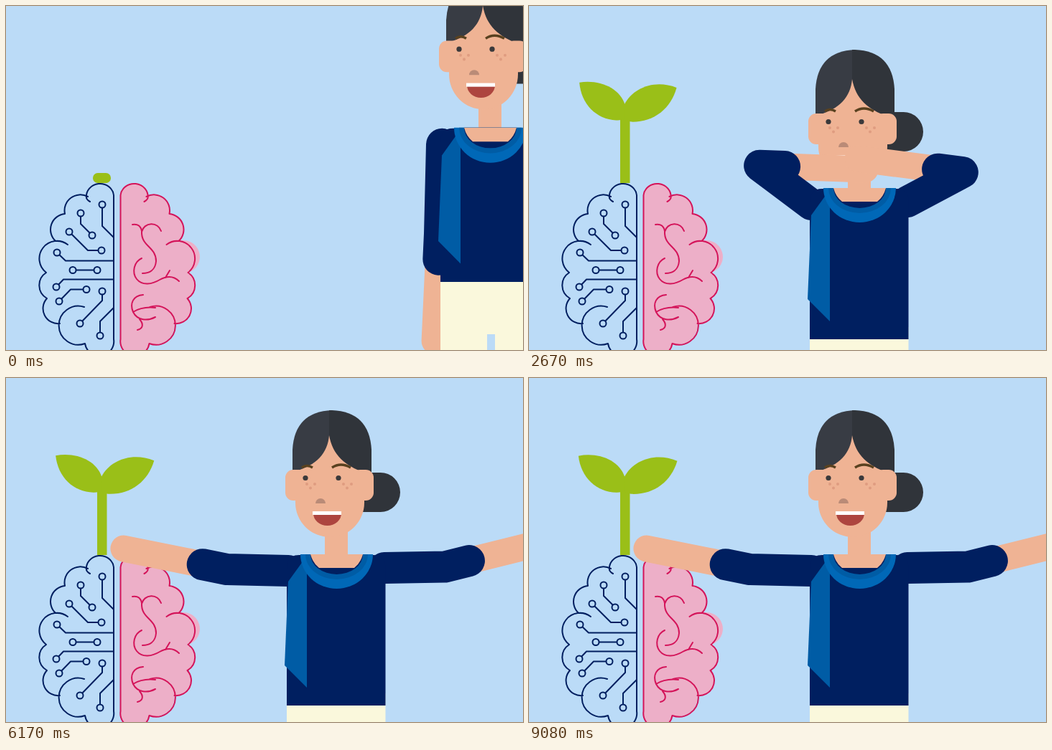
These frames come from a looping animation (720 px wide and 480 px high, 9.16 s). An HTML page:

```html
<!DOCTYPE html>
<html lang="en">
<head>
<meta charset="utf-8">
<title>Growing mind</title>
<style>
html, body { margin: 0; width: 100%; height: 100%; overflow: hidden; background: #bbdbf7; }
svg { display: block; width: 720px; height: 480px; }
</style>
</head>
<body>
<svg viewBox="0 0 720 480" xmlns="http://www.w3.org/2000/svg">
  <defs>
    <path id="half" d="M150 264A19 18 0 0 0 112 268Q113 271 117 273M114 266A22 22 0 0 0 82 290A22 22 0 0 0 69 328M86 333A22 22 0 1 0 56 372A21 21 0 0 0 57 408A21 21 0 0 0 75 443M109 420A27 27 0 1 0 110 471A20 20 0 0 0 150 465V264"/>
    <path id="halfFill" d="M150 264A19 18 0 0 0 112 266A22 22 0 0 0 82 290A22 22 0 0 0 69 328A22 22 0 0 0 56 372A21 21 0 0 0 57 408A21 21 0 0 0 75 443A27 27 0 0 0 110 471A20 20 0 0 0 150 465Z"/>
  </defs>
  <rect width="720" height="480" fill="#bbdbf7"/>

  <g fill="#9abf18">
    <rect id="stem" x="127" width="13.5"/>
    <rect id="bud" x="121" y="233" width="25" height="14" rx="6.8"/>
    <g id="leaves">
      <path id="leafL" d="M134 158Q128 160 122 160C94 160 72 140 68 110C96 104 125 115 133 138Z"/>
      <path id="leafR" d="M132 159Q136 161 142 162C173 164 198 146 207 117C178 104 146 114 133 138Z"/>
    </g>
  </g>

  <g fill="none" stroke-width="2" stroke-linecap="round" stroke-linejoin="round">
    <g stroke="#001f60">
      <use href="#half"/>
      <path d="M134 277V307L150 323M104 289V304L120 320M88 315L114 341H133M71 344L83 355.5H150M93 368.5H127M70 392L80 381.5H150M74 412L90 395.5H112M134 398V411L103 443M131 460V440L150 421"/>
      <g id="nodes" fill="#bbdbf7"></g>
    </g>
    <g stroke="#d4145a">
      <g transform="matrix(-1 0 0 1 309.5 0)">
        <use href="#halfFill" fill="#edafc8" stroke="none"/>
        <use href="#half"/>
      </g>
      <path d="M176 305Q187 303 189 314M216 314A14 14 0 0 0 189 315C188 335 209 336 209 356C208 369 199 373 190 373M189 352C178 357 175 372 182 381C190 391 204 388 214 382Q230 373 241 384M222 379L228 369M191 403C177 404 172 415 177 427C183 439 197 440 208 434M177 427Q190 419 208 421M186 437C192 444 191 450 183 452"/>
    </g>
  </g>

  <g id="head">
    <path d="M497 132H521.5A27.5 27.5 0 0 1 521.5 187H497Z" fill="#30343a"/>
    <rect x="444" y="195" width="32" height="58" fill="#efb394"/>
    <path d="M399 143V100Q402 47 454 45V143Z" fill="#383c44"/>
    <path d="M450 45H454Q506 47 509 100V146H450Z" fill="#30343a"/>
    <g id="face">
      <g fill="#efb394">
        <rect x="389" y="128" width="30" height="43" rx="11"/>
        <rect x="482" y="128" width="30" height="43" rx="11"/>
        <path d="M450 80C448 105 432 122 403 130V174A48 48 0 0 0 499 174V132C472 122 455 108 450 80Z"/>
      </g>
      <path d="M412 125Q419 120 427 125M454 125Q466 117 480 125" fill="none" stroke="#59411f" stroke-width="3.4"/>
      <g fill="#3a393b"><circle cx="417" cy="139.500" r="3.6"/><circle cx="463" cy="139.500" r="3.6"/></g>
      <g id="freckles" fill="#df9c80"></g>
      <path d="M431 175A7 7 0 0 1 445 175Z" fill="#ba8b77"/>
      <path d="M428 189H467A19.500 17 0 0 1 428 189Z" fill="#ad453f"/>
      <rect x="427" y="186" width="40" height="5" fill="#fff"/>
    </g>
  </g>
  <g id="armL" fill="none" stroke-linecap="round" stroke-linejoin="round">
    <path stroke="#efb394" stroke-width="37"/><path stroke="#001f60" stroke-width="44"/>
  </g>
  <path id="pants" d="M391 440H528.500V700H467V530H456V700H391Z" fill="#faf8dc"/>
  <g id="armR" fill="none" stroke-linecap="round" stroke-linejoin="round">
    <path stroke="#efb394" stroke-width="37"/><path stroke="#001f60" stroke-width="44"/>
  </g>
  <g id="torso">
    <path d="M391 266Q391 247 408 247H512Q528.500 247 528.500 264V457H391Z" fill="#001f60"/>
    <path d="M414 255L393 284L388 401L419 432V265Z" fill="#005ca5"/>
    <path d="M410 246A50.500 48 0 0 0 511 246Z" fill="#0068b7"/>
    <path d="M417 246A43.500 35 0 0 0 504 246Z" fill="#005ca5"/>
    <path d="M424 246A36.500 28 0 0 0 497 246Z" fill="#001f60"/>
    <path d="M424 246Q427 258 436 265H485Q494 258 497 246Z" fill="#efb394"/>
  </g>
  <path id="heart" fill="#ea4550" d="M0 16C-6 10 -17 3 -17 -6C-17 -12 -13 -15.500 -8.500 -15.500C-4.500 -15.500 -1.500 -13 0 -10C1.500 -13 4.500 -15.500 8.500 -15.500C13 -15.500 17 -12 17 -6C17 3 6 10 0 16Z"/>
</svg>
<script>
const LOOP = 9160;
const $ = id => document.getElementById(id);
const set = (id, name, value) => $(id).setAttribute(name, value);
const dots = (pts, r) => pts.map(([x, y]) => `<circle cx="${x}" cy="${y}" r="${r}"/>`).join('');

$('nodes').innerHTML = dots([[134, 277], [104, 289], [120, 320], [88, 315], [133, 341], [71, 344],
  [93, 368.5], [127, 368.5], [70, 392], [74, 412], [112, 395.5], [134, 398], [103, 443], [131, 460]], 4.5);
$('freckles').innerHTML = dots([[419, 148], [430, 148], [424, 153.5], [470, 148], [481, 148], [475, 153.5]], 2);

const clamp = u => Math.min(1, Math.max(0, u));
const smooth = u => u * u * (3 - 2 * u);
const backOut = u => 1 + 1.9 * (u - 1) ** 3 + 0.9 * (u - 1) ** 2;
const mix = (a, b, u) => a + (b - a) * u;

// x, y, tilt, stretch, head x, y, turn, face drop, then upper length, upper angle, forearm angle per arm
const enter = [214, -72, 0, 1.02, 0, -1, 0, 0, 122, 91.4, 92.7, 122, 88, 87];
const lean = [121.5, -71, -35, 1, -21, 0, -4, 15, 107, 92.6, 103, 124, 85, 99.8];
const gasp = [0, 8, 0, 1, 0, 8, 0, 6, 90, 217, 362, 87, -28, -172.6];
const hug = [0, 0, 0, 1, 0, 0, 0, 0, 85, 181.3, 191.4, 84, -1, -14];
const moves = [
  [0.05, 0.92, enter, lean, smooth],
  [1.85, 2.5, lean, gasp, smooth],
  [2.95, 3.7, gasp, hug, backOut]
];

function poseAt(t) {
  const [start, end, from, to, ease] = moves.findLast(m => t >= m[0]) || moves[0];
  const u = ease(clamp((t - start) / (end - start)));
  return from.map((v, i) => mix(v, to[i], u));
}

const sway = [[0, 10], [0.8, 0], [1.17, 21], [1.6, -5], [2.1, 5], [2.67, 3], [3.2, -1], [3.67, 1.6]];
function swayAt(t) {
  const i = sway.findIndex(k => k[0] > t);
  if (i < 0) return 0.8 - 0.8 * Math.cos((t - 4.92) / 2.5 * 2 * Math.PI);
  const [a, b] = [sway[i - 1], sway[i]];
  return mix(a[1], b[1], smooth((t - a[0]) / (b[0] - a[0])));
}

function drawPlant(t) {
  const grow = 1 - (1 - clamp((t - 0.05) / 0.7)) ** 2;
  const y = mix(241, 150, grow), lift = swayAt(t);
  set('stem', 'y', y);
  set('stem', 'height', 247 - y);
  set('bud', 'visibility', grow < 0.15 ? 'visible' : 'hidden');
  set('leaves', 'transform', `translate(133 ${y}) scale(${mix(0.12, 1, grow)}) translate(-133 -150)`);
  set('leafL', 'transform', `rotate(${lift} 133 150)`);
  set('leafR', 'transform', `rotate(${-0.8 * lift} 133 150)`);
}

function drawArm(id, x, y, upper, a, b) {
  const step = (p, len, deg) => [p[0] + len * Math.cos(deg * Math.PI / 180), p[1] + len * Math.sin(deg * Math.PI / 180)];
  const elbow = step([x, y], upper, a);
  const [skin, sleeve] = $(id).children;
  skin.setAttribute('d', `M${elbow}L${step(elbow, 147, b)}`);
  sleeve.setAttribute('d', `M${x} ${y}L${elbow}L${step(elbow, 35, b)}`);
}

function drawPerson(t) {
  const [x, y, tilt, stretch, hx, hy, turn, drop, ...arms] = poseAt(t);
  const body = `translate(${x} ${y}) rotate(${tilt} 459.5 457) translate(0 457) scale(1 ${stretch}) translate(0 -457)`;
  for (const id of ['torso', 'armL', 'armR']) set(id, 'transform', body);
  set('head', 'transform', `${body} translate(${hx} ${hy}) rotate(${turn} 460 246)`);
  set('face', 'transform', `translate(0 ${drop})`);
  set('pants', 'transform', `translate(${x} ${y})`);
  drawArm('armL', 393, 269, ...arms.slice(0, 3));
  drawArm('armR', 527, 265, ...arms.slice(3));
}

function drawHeart(t) {
  const age = (t - 3.25) % 0.96, q = age - 0.12;
  set('heart', 'visibility', t > 3.25 && age > 0.085 ? 'visible' : 'hidden');
  set('heart', 'transform', `translate(${459.5 - 88 * q} ${85.5 - 80 * q - 51 * q * q})`);
}

function draw(t) {
  drawPlant(t);
  drawPerson(t);
  drawHeart(t);
}

const begin = performance.now();
function tick() {
  draw((performance.now() - begin) % LOOP / 1000);
  requestAnimationFrame(tick);
}
tick();
</script>
</body>
</html>
```
